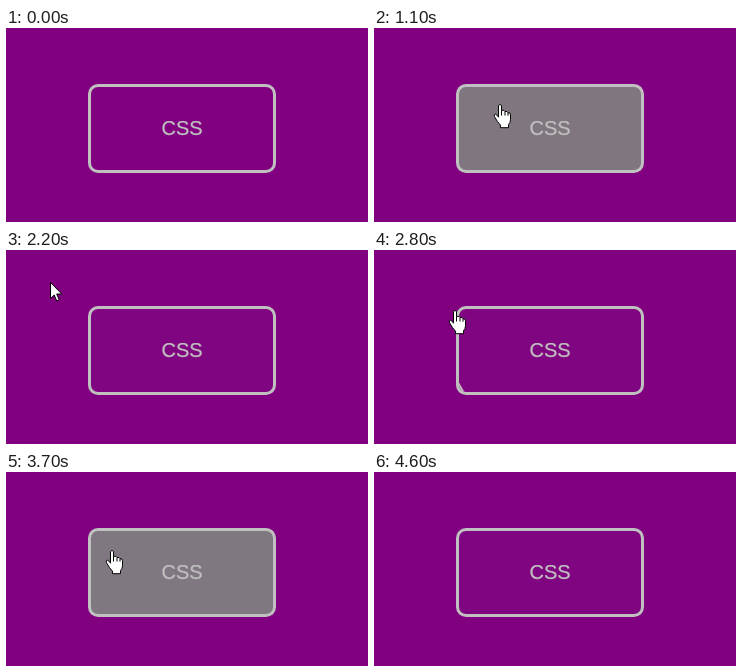
Animation, 362 px wide and 194 px high, one loop 4.9 s. Source, as an HTML page:

```html
<!DOCTYPE html>
<html lang="en">
<head>
<meta charset="utf-8">
<title>Button hover</title>
<style>
  html, body { margin: 0; width: 100%; height: 100%; overflow: hidden; background: purple; }
  svg { display: block; }
  text { font: 20px "Liberation Sans", Arial, sans-serif; fill: silver; stroke: silver; stroke-width: .25; text-anchor: middle; }
  .cursor { fill: #fff; stroke: #000; stroke-linejoin: round; }
</style>
</head>
<body>
<svg width="362" height="194" viewBox="0 0 362 194">
  <clipPath id="inside"><rect x="85" y="59" width="182" height="83" rx="7"/></clipPath>
  <rect id="fill" x="84" y="58" width="184" height="85" rx="8"/>
  <text x="176" y="106.8">CSS</text>
  <g clip-path="url(#inside)"><path id="bar" d="M0 59h58l48 83h-58z" fill="silver"/></g>
  <rect x="83.5" y="57.5" width="185" height="86" rx="8.5" fill="none" stroke="silver" stroke-width="3"/>
  <path id="arrow" class="cursor" d="M.5.5v16l3.7-3.5 2.5 5.8 2.5-1.1-2.5-5.7h5.1z"/>
  <path id="hand" class="cursor" d="M-1.5 1.5q1.5-2 3 0v5q3-1 3.5 1 2.5-.5 3 1.2 2.5-.3 2.5 2v5q0 3-2 5v3h-8v-2.5q-3-3-6-8.5-1-2.5 1-2.5 1.5.5 3 3zM1.5 6.5v5M5 7.5v4M8 8.7v3"/>
</svg>
<script>
const LOOP = 4900, STEP = 100, FADE = 600;
const [fill, bar, arrow, hand] = ['fill', 'bar', 'arrow', 'hand'].map(id => document.getElementById(id));

// The pointer enters the button and leaves it, twice
const hovers = [{ enter: 588, leave: 1624 }, { enter: 2773, leave: 4055 }];

// Each leg continues from the end of the one before; a power above 1 starts slowly
const entry = { x: 28, y: -1 };
const legs = [
  { from: 200, to: 700, x: 126, y: 76, power: 1 },
  { from: 1300, to: 1700, x: 49, y: 32, power: 3 },
  { from: 1700, to: 1900, x: 44, y: 32, power: 1 },
  { from: 2500, to: 3000, x: 106, y: 78, power: 1 },
  { from: 3600, to: 4100, x: 77, y: 16, power: 4 },
  { from: 4100, to: 4200, x: 82, y: 1, power: 1 }
];

const clamp = v => Math.max(0, Math.min(1, v));
const mix = (a, b, k) => a + (b - a) * k;

// One coordinate of a cubic Bezier from 0 to 1
const bezier = (a, b, s) => 3 * a * s * (1 - s) ** 2 + 3 * b * s * s * (1 - s) + s ** 3;

// CSS "ease": cubic-bezier(.25, .1, .25, 1)
function ease(x) {
  let lo = 0, hi = 1;
  for (let i = 0; i < 24; i++) {
    const s = (lo + hi) / 2;
    if (bezier(.25, .25, s) < clamp(x)) lo = s; else hi = s;
  }
  return bezier(.1, 1, lo);
}

function pointer(t) {
  let { x, y } = entry;
  for (const leg of legs) {
    const k = clamp((t - leg.from) / (leg.to - leg.from)) ** leg.power;
    x = mix(x, leg.x, k);
    y = mix(y, leg.y, k);
  }
  return [Math.round(x), Math.round(y)];
}

function draw(t) {
  const since = start => ease((t - start) / FADE);
  const p = hovers.reduce((sum, h) => sum + since(h.enter) - since(h.leave), 0);
  bar.setAttribute('transform', `translate(${mix(-24, 275, p)})`);

  // A faint tint remains after the first hover
  const tint = t < hovers[0].enter ? 0 : Math.max(5, 120 * p);
  fill.setAttribute('fill', `rgb(128,${Math.round(tint)},128)`);

  const visible = t >= legs[0].from && t <= legs.at(-1).to;
  const over = hovers.some(h => t >= h.enter && t < h.leave);
  for (const [el, shown] of [[hand, over], [arrow, !over]]) {
    el.style.display = visible && shown ? '' : 'none';
    el.setAttribute('transform', `translate(${pointer(t)})`);
  }
}

const start = performance.now();
function frame() {
  const t = (performance.now() - start) % LOOP;
  draw(Math.floor(t / STEP) * STEP);
  requestAnimationFrame(frame);
}
frame();
</script>
</body>
</html>
```
